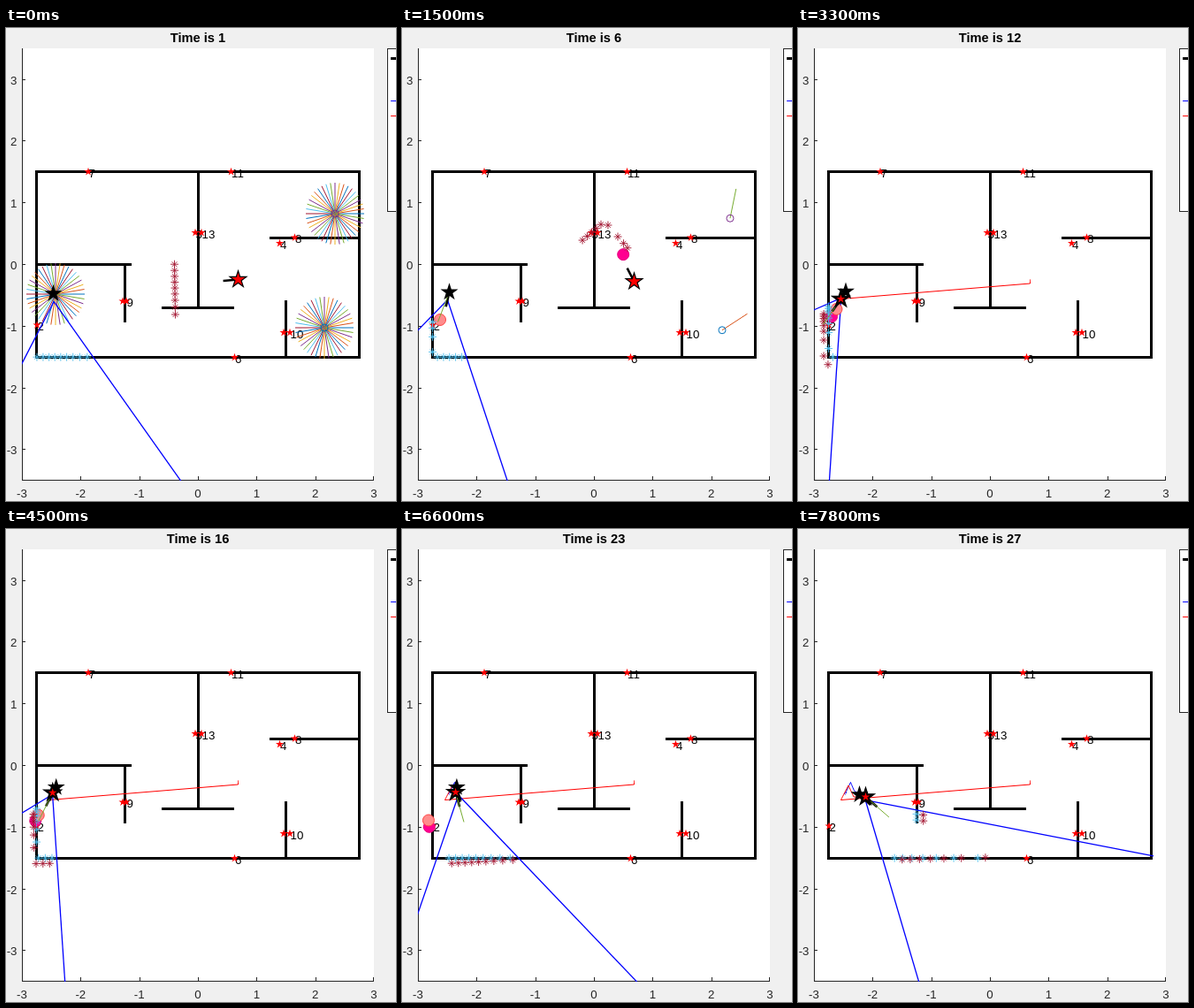
An HTML page with a canvas for the animation above (8000 ms loop, 441 px wide and 535 px high).

```html
<!DOCTYPE html>
<html lang="en">
<head>
<meta charset="utf-8">
<title>Robot localization</title>
<style>
  html, body { margin: 0; width: 100%; height: 100%; overflow: hidden; background: #f0f0f0; }
  canvas { display: block; width: 441px; height: 535px; }
</style>
</head>
<body>
<canvas id="view"></canvas>
<script>
const W = 441, H = 535, STEP = 300, LOOP = 8000, STEPS = 27;
const canvas = document.getElementById('view');
const ctx = canvas.getContext('2d');
const dpr = window.devicePixelRatio || 1;
canvas.width = W * dpr;
canvas.height = H * dpr;

const FONT = '"Liberation Sans", Arial, sans-serif';
const PALETTE = ['#0072bd', '#d95319', '#edb120', '#7e2f8e', '#77ac30', '#4dbeee', '#a2142f'];
const INK = '#262626';
const SENSOR = 9;        // sensor distance ahead of the robot centre
const HALF_VIEW = 31.3;  // degrees
const RANGE = 332;
const px = x => 217 + x * 66.33;
const py = y => 267.5 - y * 69.8;
const rad = deg => deg * Math.PI / 180;
const polar = ([x, y], deg, d) => [x + d * Math.cos(rad(deg)), y + d * Math.sin(rad(deg))];

// World units: left, top, right, bottom of each straight wall.
const WALLS = [
  [-2.75, 1.5, 2.75, 1.5], [-2.75, -1.5, 2.75, -1.5], [-2.75, 1.5, -2.75, -1.5], [2.75, 1.5, 2.75, -1.5],
  [-2.75, 0, -1.15, 0], [-1.25, 0, -1.25, -0.92], [0, 1.5, 0, -0.7],
  [-0.6, -0.7, 0.6, -0.7], [1.25, 0.43, 2.75, 0.43], [1.5, -0.6, 1.5, -1.5]
].map(([l, t, r, b]) => [px(l), py(t), px(r), py(b)]);

const BEACONS = [
  [93, 162.5, '7'], [254.5, 162.5, '11'], [214, 231.5, '5'], [221, 231.5, '13'],
  [309.5, 243.5, '4'], [326.5, 237, '8'], [132, 309, ''], [136, 309, '9'],
  [314, 344.5, ''], [321, 344.5, '10'], [258.5, 372.5, '6'], [35, 336, '2']
];

// Key poses [step, x, y, heading], linear in between. Robot B relocates at step 9.
const ROBOT_A = [[1, 53.5, 300.5, 86], [4, 52, 299, 88], [8, 55, 298.5, 118], [12, 54, 298, 125],
  [20, 59.5, 286.5, 110], [25, 63.5, 296, 56], [27, 69.5, 300.5, 42.3]];
const ROBOT_B = [[1, 262.5, 284.5, 175], [4, 262.5, 284.5, 226], [8, 262.5, 289, 259],
  [9, 48.5, 306.5, 122], [12, 48.5, 306.5, 125], [20, 57, 290, 108], [25, 63, 303, 52], [27, 76.5, 303, 41]];
const PERSON_1 = [[1, 372, 210, 240], [4, 372.5, 211.5, 244.5], [8, 369.5, 219, 318.5]];
const PERSON_2 = [[1, 360, 339, 320], [4, 359.5, 340, 323], [8, 364.5, 343.5, 331]];
const BALL = [[8, 43, 330], [12, 43.5, 318], [20, 30, 329.5]];

function at(track, step) {
  const i = track.findIndex(row => row[0] >= step);
  if (i < 0) return track[track.length - 1].slice(1);
  if (i === 0) return track[0].slice(1);
  const a = track[i - 1], b = track[i];
  const k = (step - a[0]) / (b[0] - a[0]);
  return a.slice(1).map((v, j) => v + (b[j + 1] - v) * k);
}

const sensor = ([x, y, deg]) => polar([x, y], deg, SENSOR);

// Distance along a ray to the nearest axis-aligned wall.
function cast([x, y], deg) {
  const dx = Math.cos(rad(deg)), dy = Math.sin(rad(deg));
  let best = RANGE;
  for (const [l, t, r, b] of WALLS) {
    const d = l === r ? (l - x) / dx : (t - y) / dy;
    const hit = l === r ? y + d * dy : x + d * dx;
    const inside = l === r ? hit >= t && hit <= b : hit >= l && hit <= r;
    if (d > 0 && inside) best = Math.min(best, d);
  }
  return best;
}

// Nine readings as [bearing, distance] relative to the sensor.
function scan(pose) {
  return Array.from({ length: 9 }, (_, i) => {
    const bearing = -27 + 6 * i;
    return [bearing, cast(sensor(pose), pose[2] + bearing)];
  });
}

function relative(pose, [x, y]) {
  const [sx, sy] = sensor(pose);
  return [Math.atan2(y - sy, x - sx) * 180 / Math.PI - pose[2], Math.hypot(x - sx, y - sy)];
}

const place = (pose, [bearing, d]) => polar(sensor(pose), pose[2] + bearing, d);

function line(x0, y0, x1, y1, color, width = 1) {
  ctx.beginPath();
  ctx.moveTo(x0, y0);
  ctx.lineTo(x1, y1);
  ctx.strokeStyle = color;
  ctx.lineWidth = width;
  ctx.stroke();
}

function spoke(from, deg, len, color, width = 1) {
  line(from[0], from[1], ...polar(from, deg, len), color, width);
}

function star(x, y, r, fill, edge) {
  ctx.beginPath();
  for (let i = 0; i < 10; i++) ctx.lineTo(...polar([x, y], i * 36 - 90, i % 2 ? r * 0.382 : r));
  ctx.closePath();
  ctx.fillStyle = fill;
  ctx.fill();
  if (edge) {
    ctx.strokeStyle = edge;
    ctx.lineWidth = 1.2;
    ctx.stroke();
  }
}

function disc([x, y], r, edge, fill) {
  ctx.beginPath();
  ctx.arc(x, y, r, 0, 2 * Math.PI);
  if (fill) {
    ctx.fillStyle = fill;
    ctx.fill();
  }
  ctx.strokeStyle = edge;
  ctx.lineWidth = 1;
  ctx.stroke();
}

function asterisk(p, color) {
  for (let a = 0; a < 360; a += 45) spoke(p, a, a % 90 ? 4 : 4.5, color, 0.9);
}

function burst(x, y, n = 40) {
  for (let i = 0; i < n; i++) {
    const a = i * 2 * Math.PI / n;
    line(x, y, x + 33 * Math.cos(a), y - 35 * Math.sin(a), PALETTE[i % 7]);
  }
}

function trail(track, step, color) {
  ctx.beginPath();
  for (let s = 1; s <= step; s++) {
    const [x, y] = at(track, s);
    ctx.lineTo(x, y);
  }
  ctx.strokeStyle = color;
  ctx.lineWidth = 1;
  ctx.stroke();
}

function label(str, x, y, align, font = '13.3px', color = INK) {
  ctx.font = `${font} ${FONT}`;
  ctx.textAlign = align;
  ctx.fillStyle = color;
  ctx.fillText(str, x, y);
}

function frame(step) {
  ctx.fillStyle = '#f0f0f0';
  ctx.fillRect(0, 0, W, H);
  ctx.fillStyle = '#fff';
  ctx.fillRect(18, 23, 398, 489);
  label('Time is ' + step, 217, 16, 'center', 'bold 14.67px', '#000');
  line(18.5, 23, 18.5, 512, INK);
  line(18, 511.5, 416, 511.5, INK);
  for (let v = -3; v <= 3; v++) {
    const x = Math.round(px(v)) + (v < 3 ? 0.5 : -0.5), y = Math.floor(py(v)) + 0.5;
    line(x, 507, x, 511, INK);
    line(18, y, 22, y, INK);
    label(v, px(v), 531, 'center');
    label(v, 12.5, Math.round(py(v) + 5.4), 'right');
  }
}

function legend() {
  ctx.fillStyle = '#fff';
  ctx.fillRect(431, 23, 10, 185);
  ctx.strokeStyle = INK;
  ctx.lineWidth = 1;
  ctx.strokeRect(431.5, 23.5, 20, 184);
  line(435, 34.5, 441, 34.5, '#000', 3);
  line(435, 82.5, 441, 82.5, '#00f');
  line(435, 99.5, 441, 99.5, '#f00');
}

function map() {
  ctx.lineCap = 'square';
  for (const wall of WALLS) line(...wall.map(v => Math.floor(v) + 0.5), '#000', 3);
  ctx.lineCap = 'butt';
  for (const [x, y, name] of BEACONS) label(name, x + 0.5, y + 6, 'left', '13.3px', '#000');
  for (const [x, y] of BEACONS) star(x, y, 4.8, '#f00');
}

function people(step) {
  if (step > 8) return;
  const pairs = [[PERSON_1, '#7e2f8e', '#77ac30'], [PERSON_2, '#0072bd', '#d95319']];
  for (const [track, ring, ray] of pairs) {
    const [x, y, deg] = at(track, step);
    if (step === 1) burst(x, y);
    else spoke([x, y], deg, 34, ray);
    disc([x, y], 4, ring);
  }
}

function robots(step) {
  const a = at(ROBOT_A, step), b = at(ROBOT_B, step);
  const joined = step > 8;

  if (step === 1) burst(56, 301);
  trail(ROBOT_A, step, '#00f');
  trail(ROBOT_B, step, '#f00');
  for (const side of [-1, 1]) spoke(sensor(a), a[2] + side * HALF_VIEW, RANGE, '#00f', 1.3);

  // B reads what A sees, plotted from where B believes it is.
  if (step > 5 && step < 24) {
    const ball = at(BALL, step);
    disc(place(b, relative(a, ball)), 6.5, '#e6007e', '#ff0090');
    disc(ball, 6.5, '#f44', '#ff8c8c');
  }
  for (const reading of scan(a)) {
    asterisk(place(a, reading), '#4dbeee');
    asterisk(place(b, reading), '#a2142f');
  }

  if (step > 1) spoke(a, a[2], 17, '#000', 2.6);
  spoke(b, b[2], 17, '#000', 2.6);
  if (joined) spoke(b, b[2], 35, '#77ac30');
  else if (step > 1) spoke(a, a[2] + 8, 36, step < 6 ? '#4dbeee' : '#77ac30');

  star(a[0], a[1], 10.5, '#000');
  star(b[0], b[1], joined ? 10.5 : 9.8, joined ? '#000' : '#f00', '#000');
  if (joined) star(b[0], b[1], 5, '#f00');
}

function draw(step) {
  ctx.setTransform(dpr, 0, 0, dpr, 0, 0);
  frame(step);
  legend();
  ctx.save();
  ctx.beginPath();
  ctx.rect(18, 23, 398, 489);
  ctx.clip();
  map();
  people(step);
  robots(step);
  ctx.restore();
}

let shown = 0;
function tick() {
  const step = Math.min(STEPS, Math.floor(performance.now() % LOOP / STEP) + 1);
  if (step !== shown) draw(shown = step);
  requestAnimationFrame(tick);
}
tick();
</script>
</body>
</html>
```
